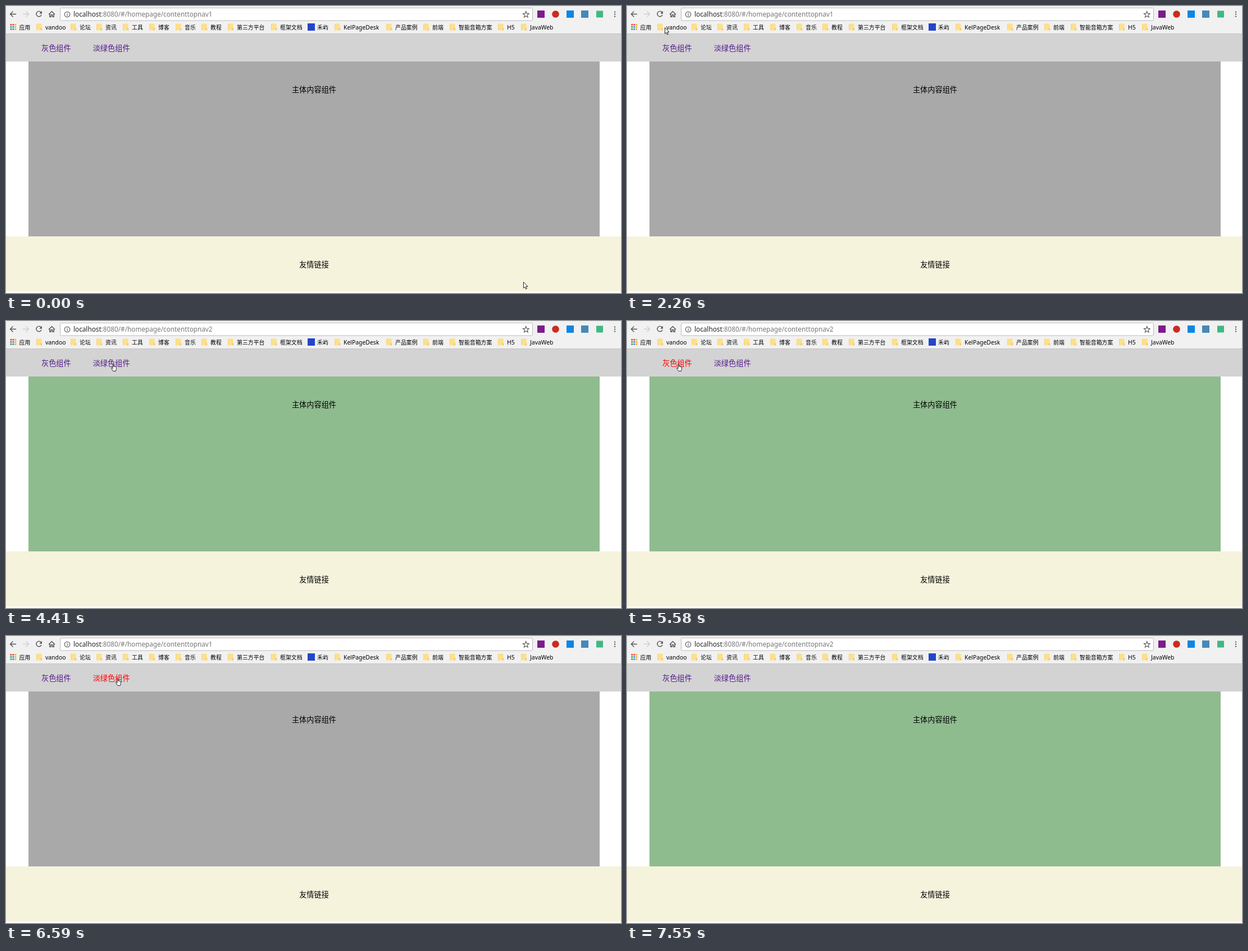
These frames come from a looping animation (1095x512 px, 9250 ms). An HTML page:

```html
<!DOCTYPE html>
<html lang="zh">
<head>
<meta charset="utf-8">
<title>Tab navigation</title>
<style>
html, body { margin: 0; width: 100%; height: 100%; overflow: hidden; background: #fff; }
svg { display: block; }
text { font-family: 'Noto Sans CJK SC', 'Noto Sans CJK', sans-serif; font-size: 13.2px; }
.bookmark { font-size: 9.9px; }
.latin { font-family: 'Noto Sans', sans-serif; font-size: 10.4px; }
.url { font-family: 'Noto Sans', sans-serif; font-size: 11.75px; fill: #777; }
.middle { text-anchor: middle; }
.icon { fill: none; stroke: #555; stroke-width: 1.4; }
</style>
</head>
<body>
<svg width="1095" height="512" viewBox="0 0 1095 512">
  <rect width="1095" height="50" fill="#f1f1f1"/>
  <path d="M0 49.5H1095" stroke="#c4c4c4"/>
  <rect id="pressed" x="46" y="2" width="24" height="25" rx="2" fill="#d8d8d8"/>

  <g class="icon">
    <path d="M18 14.5H7.5M12.5 9.5L7.5 14.5L12.5 19.5"/>
    <path d="M30 14.5H40.5M35.5 9.5L40.5 14.5L35.5 19.5" stroke="#cfcfcf"/>
    <g id="reload">
      <path d="M62.4 11.2A4.7 4.7 0 1 0 63.1 15.7"/>
      <path d="M64 9V13.7H59.3Z" fill="#555" stroke="none"/>
    </g>
    <path id="stop" d="M54 10L63 19M63 10L54 19"/>
    <path d="M76 15L81.5 9.8L87 15M77.8 14V19.2H80.2V15.8H82.8V19.2H85.2V14"/>
  </g>

  <rect x="96.5" y="3.5" width="841" height="22.5" rx="2" fill="#fff" stroke="#bbb"/>
  <g class="icon" stroke-width="1">
    <circle cx="109" cy="15" r="4.8" style="stroke-width:1.1"/>
    <path d="M109 14.2V17.8M109 12V13.2" style="stroke-width:1.2"/>
    <path d="M925.8 9.6L927.3 13.4L931.2 13.7L928.2 16.2L929.2 20.1L925.8 18L922.4 20.1L923.4 16.2L920.4 13.7L924.3 13.4Z" style="stroke-width:1.1"/>
  </g>
  <text class="url" x="120" y="19"><tspan fill="#222">localhost</tspan>:8080/#/homepage/contenttopnav<tspan id="page">1</tspan></text>

  <rect x="946" y="8" width="13" height="13" fill="#7d1a8c"/>
  <circle cx="978.5" cy="14.5" r="6.3" fill="#cc2b1d"/>
  <rect x="998" y="8" width="13" height="13" fill="#0d86e3"/>
  <rect x="1024" y="8" width="13" height="13" fill="#4788b8"/>
  <rect id="extension" x="1051" y="8.5" width="12" height="12"/>
  <g fill="#555"><circle cx="1084" cy="10.6" r="1.2"/><circle cx="1084" cy="14.6" r="1.2"/><circle cx="1084" cy="18.6" r="1.2"/></g>

  <defs>
    <g id="folder">
      <path d="M.5 1.2Q.5 .5 1.2 .5H8.8Q9.5 .5 9.5 1.2V12.2H.5Z" fill="#fde08a"/>
      <path d="M.5 12.2H7.5V8.5H10.2V12.2Z" fill="#f6cc5d"/>
      <path d="M.5 .8V12.2" stroke="#f4ce68" stroke-width=".8"/>
    </g>
  </defs>
  <g id="bookmarks"></g>

  <rect y="50" width="1095" height="49" fill="#d3d3d3"/>
  <text id="grayLink" x="63" y="79.7">灰色组件</text>
  <text id="greenLink" x="154.7" y="79.7">淡绿色组件</text>
  <rect id="content" x="40" y="99" width="1017" height="312"/>
  <text class="middle" x="548.5" y="153.8">主体内容组件</text>
  <rect y="411" width="1095" height="98.5" fill="#f5f3dc"/>
  <text class="middle" x="548.5" y="465.8">友情链接</text>

  <g fill="#fff" stroke="#111" stroke-width=".9" stroke-linejoin="round">
    <path id="arrow" d="M.5 .5V11.3L2.9 9.1L4.6 13L6.3 12.3L4.7 8.5H8Z"/>
    <path id="hand" d="M3 9V1.3Q3 .5 3.8 .5T4.6 1.3V5.2Q5.4 4.4 6.1 5.4Q7 4.7 7.5 5.9Q9 5.2 9.4 6.8V9.7L8.2 13.5H4L.6 8.7Q.3 7.3 1.6 7.5Z"/>
  </g>
</svg>
<script>
const LOOP = 9250;
const el = id => document.getElementById(id);
const svgNS = 'http://www.w3.org/2000/svg';

function add(tag, attrs, text = '') {
  const node = document.createElementNS(svgNS, tag);
  for (const name in attrs) node.setAttribute(name, attrs[name]);
  node.textContent = text;
  el('bookmarks').append(node);
}

function addLabel(x, label) {
  const latin = /^\w+$/.test(label);
  add('text', { x, y: 41.9, class: latin ? 'bookmark latin' : 'bookmark' }, label);
}

// Bookmarks bar
const [red, amber, green, blue] = ['#e8493c', '#f4b02a', '#3aa35a', '#4a86e0'];
[red, red, amber, green, blue, amber, green, blue, amber].forEach((fill, i) =>
  add('rect', { x: 7.5 + i % 3 * 4, y: 32 + Math.floor(i / 3) * 4, width: 2.8, height: 2.8, fill }));
addLabel(23.5, '应用');
add('rect', { x: 537, y: 31, width: 13, height: 13, fill: '#2346c8' });
addLabel(554, '禾屿');

const folders = {
  vandoo: 54, 论坛: 115, 资讯: 161, 工具: 208, 博客: 255, 音乐: 302, 教程: 348,
  第三方平台: 395, 框架文档: 472, KelPageDesk: 585, 产品案例: 677, 前端: 743,
  智能音箱方案: 790, H5: 876, JavaWeb: 917
};
for (const [label, x] of Object.entries(folders)) {
  add('use', { href: '#folder', x, y: 31 });
  addLabel(x + 16, label);
}

// Pointer moves: first step, last step, step count, easing, waypoints
const linear = u => u;
const smooth = u => u * u * (3 - 2 * u);
const speedUp = u => u * u;
const moves = [
  [70, 970, 13, smooth, [[921, 492], [5, 24], [62, 15]]],
  [1050, 1050, 1, linear, [[62, 15], [61, 15]]],
  [1370, 1440, 2, linear, [[61, 15], [58, 11]]],
  [2260, 2510, 4, linear, [[58, 11], [67, 38], [88, 55], [93, 74], [83, 81]]],
  [2920, 2920, 1, linear, [[83, 81], [84, 79]]],
  [3640, 4010, 6, smooth, [[84, 79], [190, 76]]],
  [4970, 5430, 7, smooth, [[190, 76], [91, 76]]],
  [6050, 6440, 6, smooth, [[91, 76], [198, 75]]],
  [6970, 7550, 8, speedUp, [[198, 75], [1250, 630]]]
];

function alongPath(points, u) {
  const position = u * (points.length - 1);
  const i = Math.min(Math.floor(position), points.length - 2);
  return points[i].map((from, axis) => from + (points[i + 1][axis] - from) * (position - i));
}

function pointerAt(t) {
  const move = moves.findLast(([start]) => t >= start);
  if (!move) return moves[0][4][0];
  const [start, end, steps, ease, points] = move;
  const interval = (end - start) / (steps - 1) || 1;
  const step = Math.min(steps, Math.floor((t - start) / interval + 1e-6) + 1);
  return alongPath(points, ease(step / steps)).map(Math.round);
}

const within = (value, from, to) => value >= from && value < to;
const show = (id, visible) => el(id).setAttribute('visibility', visible ? 'visible' : 'hidden');
const fill = (id, color) => el(id).setAttribute('fill', color);

function draw(t) {
  const greenPage = within(t, 4410, 5800) || t >= 6760;
  const grayPressed = within(t, 3170, 3330) || within(t, 5580, 5800);
  const greenPressed = within(t, 4190, 4410) || within(t, 6590, 6760);
  const loading = within(t, 1740, 1900);

  el('page').textContent = greenPage ? 2 : 1;
  fill('content', greenPage ? '#8fbc8f' : '#a9a9a9');
  fill('grayLink', grayPressed ? '#f00' : '#551a8b');
  fill('greenLink', greenPressed ? '#f00' : '#551a8b');
  fill('extension', within(t, 1740, 1980) ? '#c4c4c4' : '#41b883');
  show('pressed', within(t, 1610, 1980));
  show('reload', !loading);
  show('stop', loading);

  const [x, y] = pointerAt(t);
  const overLink = within(y, 66, 85) && (within(x, 63, 116) || within(x, 155, 221));
  show('arrow', !overLink);
  show('hand', overLink);
  el('arrow').setAttribute('transform', `translate(${x} ${y})`);
  el('hand').setAttribute('transform', `translate(${x - 3} ${y})`);
}

function tick() {
  draw(performance.now() % LOOP);
  requestAnimationFrame(tick);
}
tick();
</script>
</body>
</html>
```
